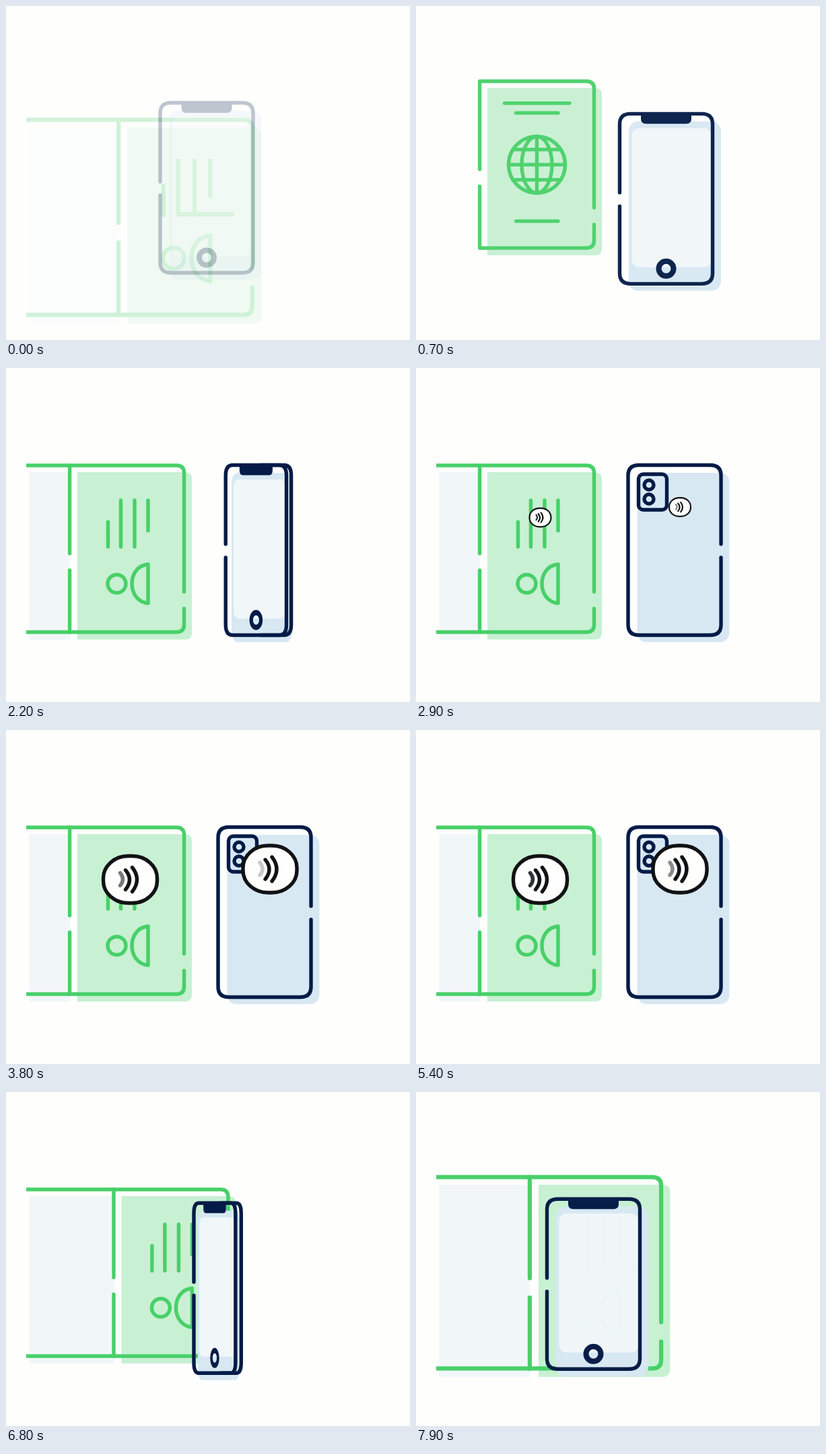
An HTML page for the animation above (8 s loop, 600 by 497 pixels).

```html
<!DOCTYPE html>
<html lang="en">
<head>
<meta charset="utf-8">
<title>Passport and phone</title>
<style>
  html, body { margin: 0; width: 100%; height: 100%; overflow: hidden; background: #fefefd; }
  svg { display: block; width: 100%; height: 100%; }
  .line { fill: none; stroke-width: 5.4; stroke-linecap: round; stroke-linejoin: round; }
  .green { stroke: #47d068; }
  .navy { stroke: #031b46; }
  .black { stroke: #111214; }
  .mint { fill: #c8f0d3; }
  .sky { fill: #d8e8f3; }
  .ice { fill: #f1f6f9; }
  .paper { fill: #fefefd; }
  .fixed { vector-effect: non-scaling-stroke; }
</style>
</head>
<body>
<svg viewBox="0 0 600 497">
  <defs>
    <clipPath id="lineClip"><rect x="30" y="0" width="570" height="497"/></clipPath>
    <clipPath id="pageClip"><rect x="34.500" y="0" width="566" height="497"/></clipPath>
    <path id="panel" d="M106 155H266Q276 155 276 165V394Q276 404 266 404H106Z"/>
    <path id="edge" d="M95 145H253Q264.500 145 264.500 156V333M264.500 358V382Q264.500 393 253 393H95"/>
    <path id="spine" d="M94.600 145V276M94.600 301V393"/>
    <path id="caseEdge" class="fixed" d="M-69 262V160Q-69 144.500 -53 144.500H53Q69 144.500 69 160V382Q69 397.500 53 397.500H-53Q-69 397.500 -69 382V282"/>
    <rect id="shade" x="-55.500" y="156" width="137" height="252" rx="14"/>
    <g id="badge">
      <rect class="line black" style="fill:#fefefd" x="-40" y="-35" width="80" height="70" rx="37" ry="33"/>
      <g class="line black"></g>
    </g>
  </defs>

  <g clip-path="url(#pageClip)">
    <g class="book"><g class="cover"><rect class="ice inside" x="95" y="155" width="170" height="249"/></g></g>
  </g>

  <g clip-path="url(#lineClip)">
    <g class="book">
      <use href="#panel" class="mint"/>
      <g class="line green">
        <use href="#edge"/>
        <path d="M151.500 229V266M170.500 197V266M191 197V266M211 197V242"/>
        <circle cx="164.500" cy="321" r="13.500"/>
        <path d="M211 292C179 295 179 347 211 350Z"/>
        <path id="baseline" d="M173 265H239"/>
      </g>
      <g class="cover">
        <g class="outside">
          <rect class="paper" x="95" y="145" width="169" height="248"/>
          <use href="#panel" class="mint"/>
          <g class="line green">
            <path d="M131.500 177.500H228M148.500 192H211M148.500 353H211"/>
            <circle cx="179.500" cy="269" r="42"/>
            <ellipse cx="179.500" cy="269" rx="22.500" ry="42"/>
            <path d="M179.500 227V311M137.500 269H221.500M144 246.500H215M144 291.500H215"/>
          </g>
        </g>
        <use href="#edge" class="line green"/>
      </g>
      <use href="#spine" class="line green"/>
    </g>
  </g>

  <g id="phone">
    <g id="rear">
      <use href="#shade" class="sky"/>
      <g class="line navy">
        <g transform="scale(-1 1)"><use href="#caseEdge"/></g>
        <rect x="-53.500" y="158" width="42" height="53" rx="7"/>
        <circle cx="-38" cy="174" r="7"/>
        <circle cx="-38" cy="195" r="7"/>
      </g>
    </g>
    <g id="front">
      <use href="#shade" class="sky"/>
      <rect class="ice" x="-51" y="166" width="118" height="207" rx="11"/>
      <use href="#caseEdge" class="line navy"/>
      <path fill="#031b46" d="M-37.500 143H37.500V152Q37.500 159.500 30 159.500H-30Q-37.500 159.500 -37.500 152Z"/>
      <circle class="line navy" style="stroke-width:8" cy="375" r="11"/>
    </g>
    <g id="side" class="line navy">
      <path class="fixed" d="M0 144.500H53Q69 144.500 69 160V382Q69 397.500 53 397.500H0"/>
    </g>
  </g>

  <g id="badges"></g>
</svg>

<script>
const LOOP = 8000, RESTART = 400;
const NS = 'http://www.w3.org/2000/svg';
const $ = id => document.getElementById(id);
const all = selector => [...document.querySelectorAll(selector)];
const set = (node, transform) => node.setAttribute('transform', transform);
const show = (node, on) => { node.style.display = on ? '' : 'none'; };

const part = (t, from, to) => Math.min(1, Math.max(0, (t - from) / (to - from)));
const ease = (t, from, to) => (1 - Math.cos(Math.PI * part(t, from, to))) / 2;
const mix = (a, b, k) => a + (b - a) * k;

// Rises past 1 by about a sixth, then settles.
function pop(t, from, to) {
  const q = part(t, from, to) - 1, spring = 2.3;
  return 1 + (spring + 1) * q ** 3 + spring * q ** 2;
}

// Each arc dims briefly, the inner one first.
function waveAlpha(time) {
  const period = 830, dip = 500;
  const u = ((time % period) + period) % period;
  return u < dip ? 1 - 0.85 * (1 - Math.cos(2 * Math.PI * u / dip)) / 2 : 1;
}

const arcs = ['M-15 -10Q-7 0 -15 9', 'M-7 -14Q5 0 -7 15', 'M3 -18Q17 0 3 18'];

function makeBadge(x, y, start) {
  const node = $('badge').cloneNode(true);
  node.removeAttribute('id');
  const waves = arcs.map(d => {
    const path = document.createElementNS(NS, 'path');
    path.setAttribute('d', d);
    node.lastElementChild.append(path);
    return path;
  });
  $('badges').append(node);
  return { x, y, start, node, waves };
}

const badges = [makeBadge(184.5, 222.5, 3675), makeBadge(392, 207, 3600)];
const books = all('.book'), covers = all('.cover');
const outside = all('.outside')[0], inside = all('.inside')[0];

function drawBook(t, enter, exit, alpha) {
  const x = mix(179.75, 266.75, ease(t, 6200, 7100));
  const y = 269 - 54 * (1 - enter) + 45.5 * exit;
  const scale = mix(1, 1.178, ease(t, 7350, 8100));
  const turn = Math.cos(Math.PI * ease(t, 1350, 2100));
  for (const book of books) {
    set(book, `translate(${x} ${y}) scale(${scale}) translate(-179.75 -269)`);
    book.style.opacity = alpha;
  }
  for (const cover of covers) set(cover, `translate(95 0) scale(${turn} 1) translate(-95 0)`);
  show(outside, turn > 0);
  show(inside, turn <= 0);
  show($('baseline'), exit > 0);
}

function drawPhone(t, enter, exit, alpha) {
  const x = mix(371.5, 384, ease(t, 1900, 2760)) - 120.5 * ease(t, 6250, 7250) + 34.5 * exit;
  const y = 26 * (1 - enter) + 30 * (ease(t, 6250, 7130) - ease(t, 7780, 8020)) - exit;
  const angle = Math.PI * (ease(t, 1900, 2760) - ease(t, 6250, 7175));
  const way = Math.cos(angle) >= 0 ? 1 : -1;
  const width = Math.max(Math.abs(Math.cos(angle)), 0.01);
  const depth = 9.4 * Math.sin(angle);
  set($('phone'), `translate(${x} ${y})`);
  $('phone').style.opacity = alpha;
  show($('front'), way > 0);
  show($('rear'), way < 0);
  show($('side'), depth > 0.3);
  set(way > 0 ? $('front') : $('rear'), `translate(${-way * depth / 2} 0) scale(${width} 1)`);
  set($('side'), `translate(${way * depth / 2} 0) scale(${way * width} 1)`);
}

function drawBadges(t) {
  const scale = pop(t, 2850, 3450) * (1 - ease(t, 5950, 6220));
  for (const { x, y, start, node, waves } of badges) {
    show(node, scale > 0.15);
    set(node, `translate(${x} ${y}) scale(${scale})`);
    waves.forEach((wave, i) => { wave.style.opacity = waveAlpha(t - start - i * 200); });
  }
}

// The fade-out runs past the loop's end into its first moments.
function draw(now) {
  const t = now < RESTART ? now + LOOP : now;
  const enter = ease(t, 400, 1100);
  const exit = ease(t, 7900, 8000);
  const alpha = ease(t, 400, 750) * Math.exp(-Math.max(0, t - 7900) / 72);
  drawBook(t, enter, exit, alpha);
  drawPhone(t, enter, exit, alpha);
  drawBadges(t);
}

const began = performance.now();
function tick() {
  draw((performance.now() - began) % LOOP);
  requestAnimationFrame(tick);
}
tick();
</script>
</body>
</html>
```
